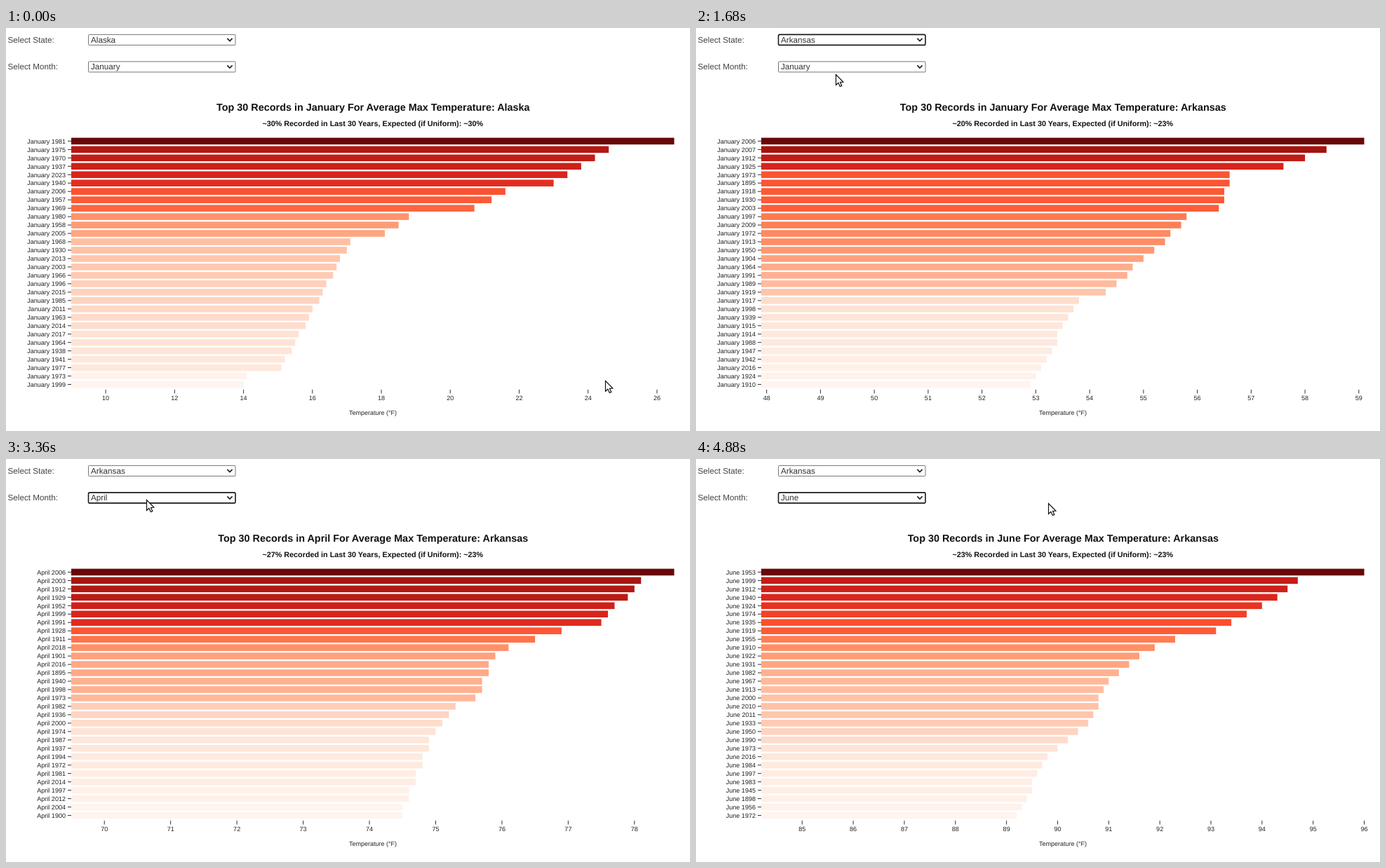
An HTML page with a canvas for the animation above (4960 ms loop, 975 by 575 pixels).

```html
<!DOCTYPE html>
<html lang="en">
<head>
<meta charset="utf-8">
<title>Temperature records</title>
<style>
  html, body { margin: 0; width: 100%; height: 100%; overflow: hidden; background: #fff; }
  canvas { display: block; }
</style>
</head>
<body>
<canvas id="stage" width="975" height="575"></canvas>
<script>
const ctx = document.getElementById('stage').getContext('2d');
const LOOP = 4960, STEP = 80;
const LEFT = 93, RIGHT = 952.5, ROW = 14.58, RECORDS = 30;

const STATES = ['Alaska', 'Alabama', 'Arkansas', 'Arizona', 'California', 'Colorado', 'Connecticut',
  'Delaware', 'Florida', 'Georgia', 'Iowa', 'Idaho', 'Illinois', 'Indiana', 'Kansas', 'Kentucky',
  'Louisiana', 'Massachusetts', 'Maryland', 'Maine'];
const MONTHS = ['January', 'February', 'March', 'April', 'May', 'June', 'July', 'August',
  'September', 'October', 'November', 'December'];

// curve: rank and temperature at the few places where the slope changes
const CHARTS = [
  {
    start: 0, state: 'Alaska', month: 'January', recent: 30, expected: 30, tick: 2,
    firstYear: 1926, topYear: 1981,
    curve: [[0, 26.5], [1, 24.6], [5, 23], [6, 21.6], [8, 20.7], [9, 18.8], [11, 18.1],
      [12, 17.1], [27, 15.1], [28, 14.1], [29, 14]]
  },
  {
    start: 1680, state: 'Arkansas', month: 'January', recent: 20, expected: 23, tick: 1,
    firstYear: 1895, topYear: 2006,
    curve: [[0, 59.1], [1, 58.4], [3, 57.6], [4, 56.6], [8, 56.4], [9, 55.8], [13, 55.2],
      [18, 54.3], [19, 53.8], [29, 52.9]]
  },
  {
    start: 3200, state: 'Arkansas', month: 'April', recent: 27, expected: 23, tick: 1,
    firstYear: 1895, topYear: 2006,
    curve: [[0, 78.6], [1, 78.1], [6, 77.5], [7, 76.9], [9, 76.1], [10, 75.9], [15, 75.6],
      [16, 75.3], [20, 74.9], [29, 74.5]]
  },
  {
    start: 4720, state: 'Arkansas', month: 'June', recent: 23, expected: 23, tick: 1,
    firstYear: 1895, topYear: 1953,
    curve: [[0, 96], [1, 94.7], [3, 94.3], [7, 93.1], [8, 92.3], [10, 91.6], [13, 91],
      [18, 90.6], [22, 89.8], [29, 89.2]]
  }
];

// Evenly spaced stops from coolest to hottest
const REDS = ['fff4ee', 'fee3d5', 'ffbea1', 'ff966e', 'ff7047', 'fc4c2c', 'da251d', 'a91510', '690709']
  .map((hex, i) => [i, ...[0, 2, 4].map(n => parseInt(hex.slice(n, n + 2), 16))]);

// time, x, y of the pointer tip
const POINTER = [
  [0, 854, 503], [560, 228, 24], [880, 218, 19], [1040, 218, 25], [1520, 199, 66],
  [1680, 199, 66], [2400, 200, 56], [2560, 200, 56], [2800, 200, 81], [3120, 200, 112],
  [3360, 200, 58], [4000, 200, 58], [4480, 187, 149], [4720, 187, 149], [4880, 502, 63]
];

const within = (t, from, to) => t >= from && t < to;
const linear = k => k;
const smooth = k => k * k * (3 - 2 * k);

// Each key is a position followed by the values held there
function along(keys, at, ease = linear) {
  const next = keys.findIndex(key => key[0] > at);
  if (next < 0) return keys[keys.length - 1].slice(1);
  const a = keys[next - 1], b = keys[next];
  const k = ease((at - a[0]) / (b[0] - a[0]));
  return a.slice(1).map((v, i) => v + (b[i + 1] - v) * k);
}

const heat = k => `rgb(${along(REDS, k * (REDS.length - 1)).map(Math.round)})`;
const pointerAt = t => along(POINTER, t, smooth);

function pickYears({ firstYear, topYear, start }) {
  const years = new Set([topYear]);
  let seed = start + 7;
  while (years.size < RECORDS) {
    seed = (seed * 16807) % 2147483647;
    years.add(firstYear + seed % (2024 - firstYear));
  }
  return [...years];
}

for (const c of CHARTS) {
  c.records = pickYears(c).map((year, rank) =>
    ({ year, temp: Math.round(along(c.curve, rank)[0] * 10) / 10 }));
}

function rect(x, y, w, h, color) {
  ctx.fillStyle = color;
  ctx.fillRect(x, y, w, h);
}

// y is the middle of the capital letters
function text(s, x, y, size, { align = 'left', color = '#222', bold = false } = {}) {
  ctx.font = `${bold ? 'bold ' : ''}${size}px "Liberation Sans", Arial, sans-serif`;
  ctx.textAlign = align;
  ctx.fillStyle = color;
  ctx.fillText(s, x, y + size * 0.358);
}

function path(points, close) {
  ctx.beginPath();
  points.forEach(([x, y]) => ctx.lineTo(x, y));
  if (close) ctx.closePath();
}

function drawChart(c) {
  const max = c.records[0].temp, min = c.records[RECORDS - 1].temp, low = min - 5;
  const toX = v => LEFT + (v - low) / (max - low) * (RIGHT - LEFT);
  const heading = { align: 'center', color: '#111', bold: true };

  text(`Top 30 Records in ${c.month} For Average Max Temperature: ${c.state}`, 523.3, 113, 14.4, heading);
  text(`~${c.recent}% Recorded in Last 30 Years, Expected (if Uniform): ~${c.expected}%`, 522.8, 136.5, 10.8, heading);

  c.records.forEach(({ year, temp }, i) => {
    const y = 161.4 + i * 11.97;
    rect(LEFT, y - 4.8, toX(temp) - LEFT, 9.6, heat((temp - min) / (max - min)));
    rect(88, y - 0.5, 5, 1, '#333');
    text(`${c.month} ${year}`, 85, y, 9.05, { align: 'right' });
  });

  for (let v = Math.ceil(low / c.tick) * c.tick; v <= max; v += c.tick) {
    rect(toX(v) - 0.5, 516, 1, 5.5, '#333');
    text(v, toX(v), 527.3, 9.05, { align: 'center' });
  }
  text('Temperature (°F)', 523, 549, 9, { align: 'center' });
}

function drawSelect(label, value, y, focused, open) {
  text(label, 2.5, y, 11.7, { color: '#444' });
  ctx.beginPath();
  ctx.roundRect(117.5, y - 7.4, 209.5, 15, focused ? 2 : 1);
  ctx.fillStyle = '#fff';
  ctx.fill();
  ctx.lineWidth = focused ? 1.6 : 1;
  ctx.strokeStyle = focused ? '#1a1a1a' : open ? '#555' : '#767676';
  ctx.stroke();
  text(value, 121, y, 11.7, { color: '#333' });
  path([[315.4, y - 2], [319, y + 1.8], [322.6, y - 2]]);
  ctx.lineWidth = 1.7;
  ctx.strokeStyle = '#222';
  ctx.stroke();
}

function drawList(items, top, active, scrolls) {
  const height = items.length * ROW + 1;
  ctx.save();
  ctx.shadowColor = 'rgba(0,0,0,.35)';
  ctx.shadowBlur = 4;
  ctx.shadowOffsetY = 2;
  rect(117, top - 0.5, 210, height + 1, '#fff');
  ctx.restore();
  rect(118, top + active * ROW, scrolls ? 193.5 : 208, ROW, '#0f62cf');
  items.forEach((item, i) =>
    text(item, 121.5, top - 0.4 + (i + 0.5) * ROW, 11.7, { color: i === active ? '#fff' : '#222' }));
  if (scrolls) {
    rect(312, top, 14.5, height, '#f1f1f1');
    rect(313, 40, 12, 107, '#c1c1c1');
    path([[315.5, 35], [319, 31], [322.5, 35]], true);
    ctx.fillStyle = '#a0a0a0';
    ctx.fill();
    path([[315.5, 306.5], [319, 310.5], [322.5, 306.5]], true);
    ctx.fillStyle = '#505050';
    ctx.fill();
  }
  ctx.lineWidth = 1;
  ctx.strokeStyle = '#666';
  ctx.strokeRect(117.5, top - 0.5, 209, height);
}

function drawPointer([x, y]) {
  ctx.save();
  ctx.translate(x + 0.5, y + 0.5);
  path([[0, 0], [0, 14.8], [3.4, 11.7], [5.8, 17], [8.3, 15.9], [6, 10.8], [10.4, 10.5]], true);
  ctx.fillStyle = '#fff';
  ctx.fill();
  ctx.lineWidth = 1.2;
  ctx.strokeStyle = '#111';
  ctx.stroke();
  ctx.restore();
}

function draw(t) {
  const chart = CHARTS.filter(c => c.start <= t).pop();
  const stateOpen = within(t, 800, 1680);
  const monthOpen = within(t, 2560, 3200) || within(t, 4000, 4720);
  const stateFocus = within(t, 1680, 2560);
  const monthFocus = within(t, 3200, 4000) || t >= 4720;

  // The highlight trails the pointer by one step
  const hoverY = pointerAt(Math.max(0, t - STEP))[1];
  const hovered = (items, top, value) =>
    hoverY < top ? items.indexOf(value) : Math.floor((hoverY - top) / ROW);

  rect(0, 0, 975, 575, '#fff');
  drawChart(chart);
  drawSelect('Select State:', chart.state, 16.8, stateFocus, stateOpen);
  drawSelect('Select Month:', chart.month, 55.3, monthFocus, monthOpen);
  if (stateOpen) drawList(STATES, 23.8, hovered(STATES, 23.8, chart.state), true);
  if (monthOpen) drawList(MONTHS, 61.8, hovered(MONTHS, 61.8, chart.month), false);
  drawPointer(pointerAt(t));
}

ctx.textRendering = 'geometricPrecision';
const began = performance.now();
function frame() {
  const t = (performance.now() - began) % LOOP;
  draw(Math.floor(t / STEP) * STEP);
  requestAnimationFrame(frame);
}
frame();
</script>
</body>
</html>
```
